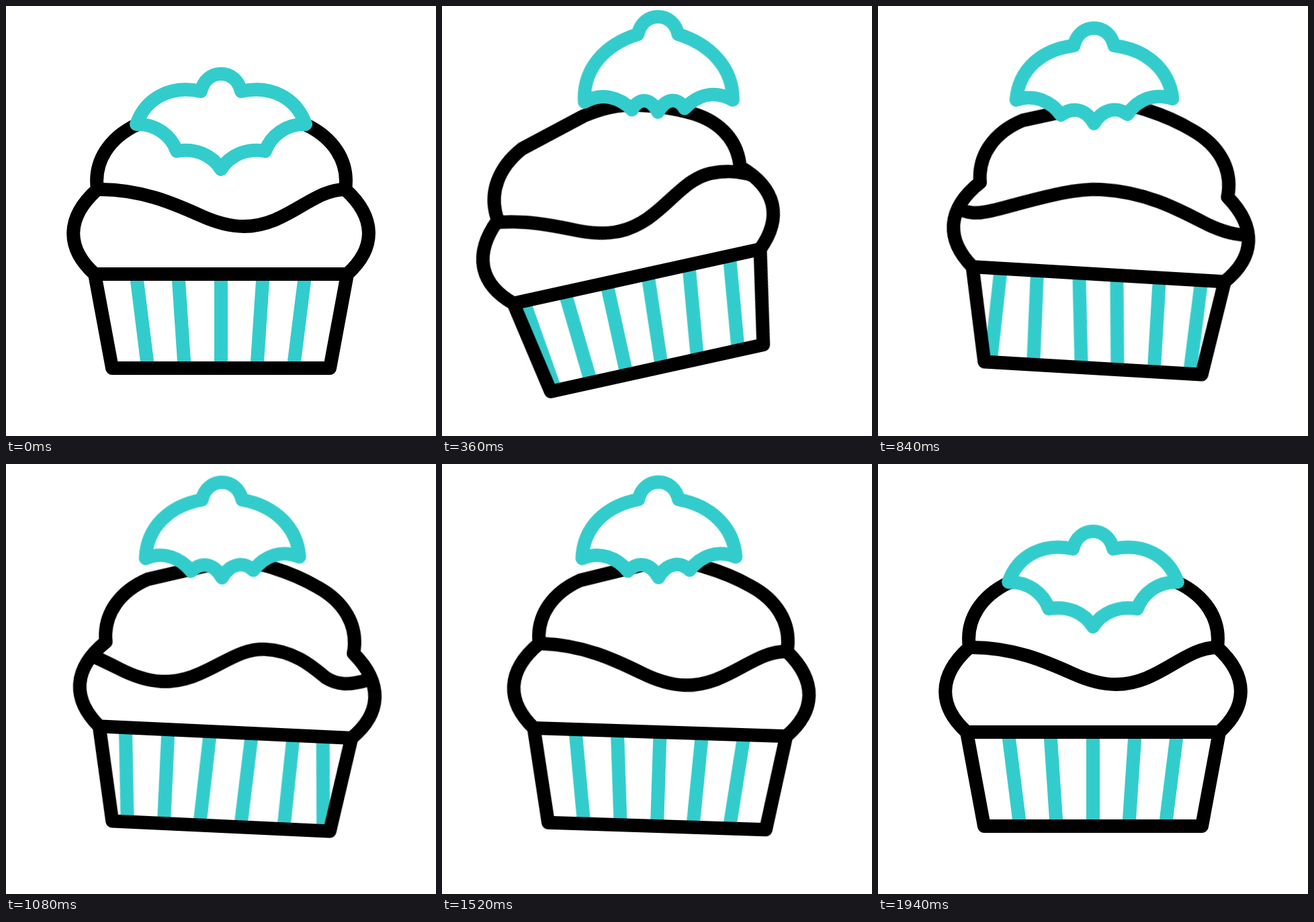
An HTML page without scripts that plays this animation: 640 by 640 pixels, repeating every 2400 ms.

```html
<!DOCTYPE html>
<html lang="en">
<head>
<meta charset="utf-8">
<title>Bat cupcake</title>
<style>
  html, body { margin: 0; width: 100%; height: 100%; overflow: hidden; background: #fff; }
  svg { display: block; width: 100vw; height: 100vh; }
  path { fill: none; stroke: #000; stroke-width: 20; stroke-linejoin: round; stroke-linecap: round; }
  .teal path, .bat { stroke: #3cc; }
  .teal path { stroke-linecap: square; }
  .bat { fill: #fff; }

  .cake, .teal, .wave, .hop, .bat, .s1, .s2, .s3 {
    animation: 2400ms cubic-bezier(.37, 0, .63, 1) infinite;
  }
  .cake { transform-origin: 320px 539px; animation-name: sway; }
  .teal { animation-name: spin; }
  .wave { animation-name: swirl; }
  .hop  { animation-name: hop; }
  .bat  { animation-name: flap; }
  .s1   { animation-name: lean1; }
  .s2   { animation-name: lean2; }
  .s3   { animation-name: lean3; }

  /* damped swing around the foot of the cup */
  @keyframes sway {
    0% { transform: rotate(0deg); }
    24.17% { transform: rotate(-18deg); }
    38.96% { transform: rotate(7.5deg); }
    52.5% { transform: rotate(-4deg); }
    63.75% { transform: rotate(1.87deg); }
    76.67%, 100% { transform: rotate(0deg); }
  }

  /* wind up to the left, then one full turn to the right */
  @keyframes spin {
    0% { transform: translateX(0); }
    20.83% { transform: translateX(-56px); animation-timing-function: cubic-bezier(.5, 0, .8, .7); }
    27.5% { transform: translateX(-48px); animation-timing-function: cubic-bezier(.4, .15, .75, .75); }
    35% { transform: translateX(90px); animation-timing-function: linear; }
    45% { transform: translateX(274px); animation-timing-function: cubic-bezier(.25, .56, .6, 1); }
    55.4%, 100% { transform: translateX(360px); }
  }
  @keyframes swirl {
    0% { transform: translateX(0); }
    20.83% { transform: translateX(-55px); animation-timing-function: cubic-bezier(.5, 0, .8, .7); }
    27.5% { transform: translateX(-39px); animation-timing-function: cubic-bezier(.4, .15, .75, .75); }
    35% { transform: translateX(178px); animation-timing-function: linear; }
    45% { transform: translateX(543px); animation-timing-function: cubic-bezier(.2, .6, .5, 1); }
    55.8%, 100% { transform: translateX(677px); }
  }

  /* the three stripes that change their slant during the turn */
  @keyframes lean1 {
    0%, 27.5% { d: path("M84 409L84 529"); }
    35% { d: path("M83 409L77 529"); }
    45% { d: path("M84 409L75 529"); }
    55.4%, 100% { d: path("M84 409L69 529"); }
  }
  @keyframes lean2 {
    0%, 27.5% { d: path("M133 409L155 529"); }
    35% { d: path("M138 409L140 529"); }
    45% { d: path("M146 409L139 529"); }
    55.4%, 100% { d: path("M147 409L133 529"); }
  }
  @keyframes lean3 {
    0%, 27.5% { d: path("M195 409L210 529"); }
    35% { d: path("M201 409L211 529"); }
    45%, 100% { d: path("M191 409L197 529"); }
  }

  @keyframes hop {
    0%, 81.67%, 100% { transform: translate(0, 0); }
    16.67%, 40% { transform: translate(1.5px, -87px); }
    28.6%, 54.17% { transform: translate(1.5px, -39.5px); }
    68.33% { transform: translate(2.5px, -87px); }
  }
  @keyframes flap {
    0%, 28.6%, 54.17%, 81.67%, 100% {
      d: path("M290 127C294 110 306 101 320 101C334 101 346 110 350 127C395 117 432 137 446 176C417 175 394 193 386 216C358 211 333 222 320 243C307 222 282 211 254 216C246 193 223 175 194 176C208 137 245 117 290 127Z");
    }
    16.67%, 40%, 68.33% {
      d: path("M290 127C294 110 306 101 320 101C334 101 346 110 350 127C399 143 432 179 431 226C404 211 379 217 359 238C350 221 332 221 320 243C308 220 291 222 282 240C263 221 236 214 211 229C208 179 241 143 290 127Z");
    }
  }
</style>
</head>
<body>
<svg viewBox="0 0 640 640">
  <defs>
    <clipPath id="cup"><path d="M132 399L158 539H482L508 399Z"/></clipPath>
    <clipPath id="bulge"><path d="M136 250V273C89 315 89 360 132 399H508C551 360 551 315 505 273V250Z"/></clipPath>
    <path id="ripple" d="M136 273C200 272 250 294 290 312C312 322 333 328 354 328C418 328 455 273 505 273C550 273 578 296 598 311C625 327 650 315 690 302C730 289 776 273 813 273"/>
  </defs>

  <g class="cake">
    <g clip-path="url(#cup)">
      <g class="teal">
        <path d="M-165 409L-150 529M-103 409L-95 529M-40 409V529M22 409L14 529"/>
        <path class="s1" d="M84 409L84 529"/>
        <path class="s2" d="M133 409L155 529"/>
        <path class="s3" d="M195 409L210 529"/>
        <path d="M257 409L265 529M320 409V529M382 409L374 529M444 409L429 529M506 409L491 529"/>
      </g>
    </g>
    <g clip-path="url(#bulge)">
      <g class="wave">
        <use href="#ripple"/>
        <use href="#ripple" x="-677"/>
      </g>
    </g>
    <path d="M132 399L158 539H482L508 399Z"/>
    <path d="M132 399C89 360 89 315 136 273C130 230 155 196 194 177L294 149C320 144 350 143 378 151C405 158 428 167 447 177C486 196 511 230 505 273C551 315 551 360 508 399"/>
  </g>

  <g class="hop">
    <path class="bat" d="M290 127C294 110 306 101 320 101C334 101 346 110 350 127C395 117 432 137 446 176C417 175 394 193 386 216C358 211 333 222 320 243C307 222 282 211 254 216C246 193 223 175 194 176C208 137 245 117 290 127Z"/>
  </g>
</svg>
</body>
</html>
```
